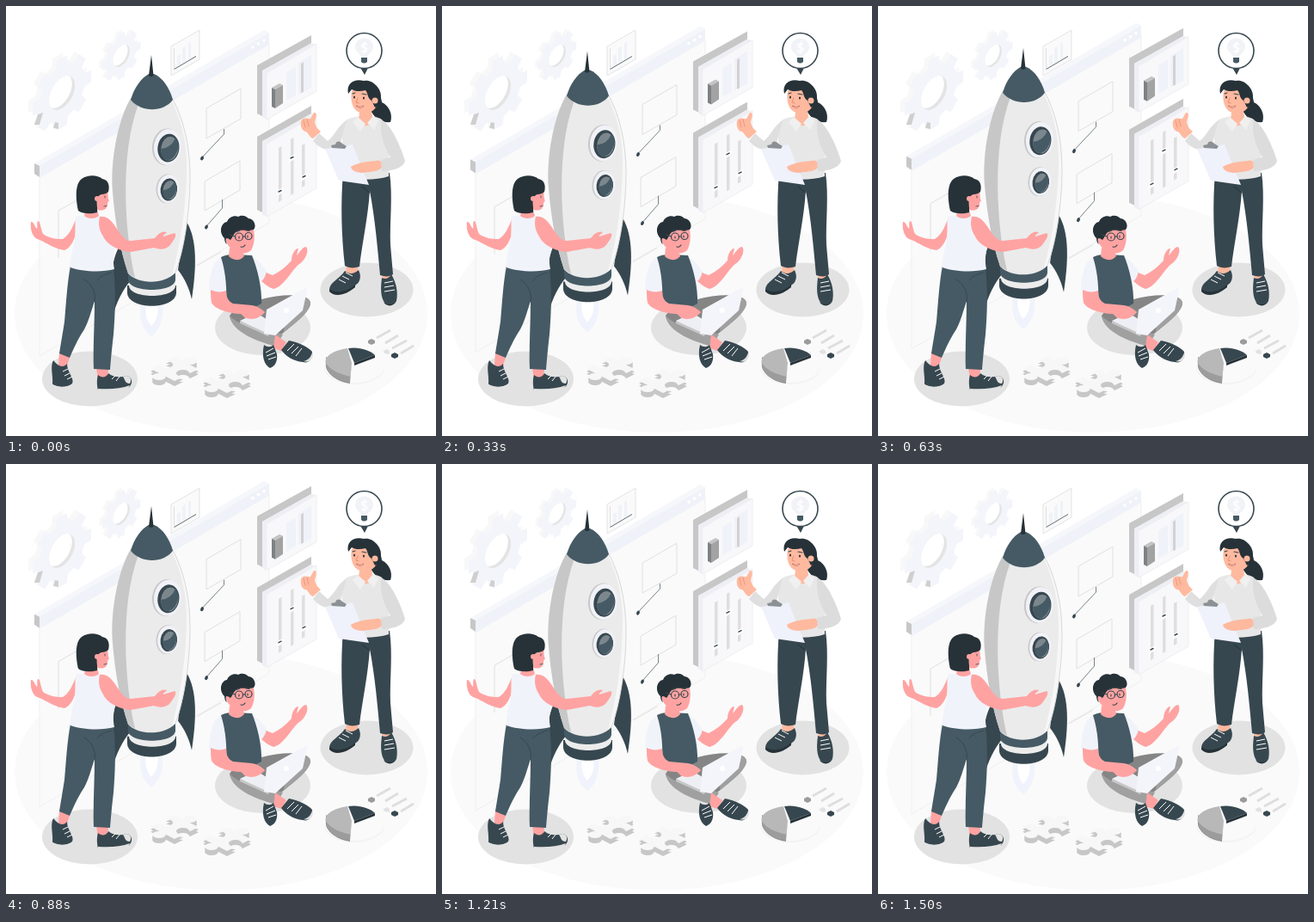
An HTML page for the animation above (1.54 s loop, 500 by 500 pixels).

```html
<!DOCTYPE html>
<html lang="en">
<head>
<meta charset="utf-8">
<title>Rocket launch team</title>
<style>
html, body { margin: 0; width: 100%; height: 100%; overflow: hidden; background: #fff; }
svg { display: block; width: 100%; height: 100%; }
.ink { fill: #263238; } .dark { fill: #37474f; } .slate { fill: #455a64; }
.pink { fill: #ffa3a2; } .peach { fill: #ffb99f; }
.snow { fill: #fafafa; } .mist { fill: #f0f2f9; } .pale { fill: #e2e2e2; } .grey { fill: #c7c7c7; }
.cloth { fill: #f1f3fb; }
.line { fill: none; stroke: #e0e0e0; }
.thin { fill: none; stroke: #37474f; stroke-linecap: round; }
.lace { fill: none; stroke: #fff; stroke-width: 1; }
</style>
</head>
<body>
<svg viewBox="0 0 500 500">
<defs>
  <path id="cog"/>
  <path id="piece" d="M-15-15h11a6 6 0 1 0 8 0h11v11a6 6 0 1 1 0 8v11h-11a6 6 0 1 0-8 0h-11v-11a6 6 0 1 1 0-8z"/>
  <g id="gear">
    <use href="#cog" fill="#f8f8f8" transform="translate(-6 -6)"/>
    <use href="#cog" fill="#f4f5fb"/>
    <circle r="18" fill="#e4e4e4"/>
    <clipPath id="hole"><circle r="18"/></clipPath>
    <g clip-path="url(#hole)"><circle cx="-4" cy="-4" r="18" fill="#fff"/></g>
  </g>
  <g id="puzzle">
    <use href="#piece" class="grey" transform="translate(0 6) matrix(.93 -.46 .93 .48 0 0)"/>
    <use href="#piece" class="grey" transform="translate(0 3) matrix(.93 -.46 .93 .48 0 0)"/>
    <use href="#piece" fill="#f7f7f7" transform="matrix(.93 -.46 .93 .48 0 0)"/>
  </g>
</defs>

<ellipse cx="250" cy="358" rx="240" ry="138" class="snow"/>
<g class="pale">
  <ellipse cx="97.500" cy="433.500" rx="55.500" ry="32"/>
  <ellipse cx="298.500" cy="374" rx="55.500" ry="32"/>
  <ellipse cx="419.500" cy="330" rx="54" ry="31.500"/>
</g>

<use href="#gear" transform="matrix(.84 -.48 0 1 65 101)"/>
<use href="#gear" transform="matrix(.55 -.31 0 .65 134 58)"/>
<path d="M33 138l4-12 6-2-4 14zM55 142l2-7 4 1v7z" fill="#cfcfcf"/>
<path d="M192 47l33-19v34l-33 19z" fill="#fafafa" stroke="#e4e4e4"/>
<path d="M199 58l4-2v12l-4 2zM205 49l4-2v17l-4 2zM212 44l3-2v19l-3 1z" class="mist"/>
<path d="M195.500 49v24" class="line"/>
<path d="M195.500 73.500L221 58.500" class="line" style="stroke:#606c72"/>

<g id="float">
  <path d="M39 198L306 43V252L39 407z" class="snow" stroke="#f0f0f0"/>
  <path d="M33 183L300 28l6 3L39 187z" fill="#f6f7fb"/>
  <path d="M39 186L306 31v14L39 200z" class="mist"/>
  <path d="M33 183l6 3v13l-6-4z" class="grey"/>
  <g fill="#fff"><circle cx="287" cy="48" r="1.800"/><circle cx="293.500" cy="44" r="1.800"/><circle cx="300" cy="40" r="1.800"/></g>
  <path d="M233 119l40-23v35l-40 23zM231 204l41-24v34l-41 24zM61 293V238l42-24M222 302l28-16" class="line"/>
  <path d="M253.500 143v6L229 175M251.500 225v10L234 255" class="line" style="stroke:#78838a"/>
  <ellipse cx="228" cy="177" rx="1.800" ry="2.600" class="dark" transform="rotate(25 228 177)"/>
  <ellipse cx="233" cy="257" rx="1.800" ry="2.600" class="dark" transform="rotate(25 233 257)"/>

  <path d="M292 69l63-35v10l-55 33v52l-8-4z" class="grey"/>
  <path d="M298 75l57-32 6 2-58 33v54l-5-3z" fill="#eeeff4"/>
  <path d="M303 78l58-34v55l-58 33z" fill="#f8f8fa" stroke="#efeff2"/>
  <path d="M309 95l9-5 4 2-9 5z" fill="#c4c4c4"/>
  <path d="M309 95l4 2v22l-4-2z" fill="#7d8285"/><path d="M313 97l9-5v21l-9 6z" fill="#a3a3a3"/>
  <path d="M326 77l11-6v33l-11 6zM340 66l15-9v38l-15 8z" class="mist"/>
  <path d="M343 67l3-2v35l-3 1z" fill="#d2d2d2"/>

  <path d="M292 152l63-36v9l-55 34v82l-8-4z" class="grey"/>
  <path d="M298 157l57-32 6 3-58 33v84l-5-3z" fill="#eeeff4"/>
  <path d="M303 160l58-34v86l-58 33z" fill="#f8f8fa" stroke="#efeff2"/>
  <path d="M317 165l3.500-2v63l-3.500 2zM331 155l3.500-2v65l-3.500 2zM344 162l3.500-2v49l-3.500 2z" fill="#dedede"/>
  <path d="M315 215l7-4v6l-7 4zM329 176l7-4v6l-7 4zM343 198l7-4v6l-7 4z" fill="#fff"/>
  <path d="M317 216l3-1.500M331 177l3-1.500M345 199l3-1.500" class="thin" stroke-width="1.500"/>

  <path d="M158 344c-5 19 1 33 11 40 11-8 15-23 13-40z" fill="#f0f3fc"/>
  <path d="M163 345c-2 13 1 22 6 27 6-6 9-15 7-27z" fill="#fff"/>
  <path d="M136 274c-14 15-16 48-12 88 4-18 12-32 21-43z" class="dark"/>
  <path d="M208 248c13 18 15 48 8 93-3-13-8-24-16-34z" class="dark"/>
  <path d="M141 325v8c0 21 57 21 57 0v-8z" class="dark"/>
  <path d="M143 317v8c0 16 54 16 54 0v-8z" fill="#ececec"/>
  <path d="M142 308v10c0 16 55 16 55 0v-10z" class="slate"/>
  <path d="M146 106c-15 23-25 72-22 110 3 37 9 68 18 95 12 13 42 13 55-1 10-27 17-70 17-112 0-37-8-69-21-92z" fill="#ebebeb"/>
  <path d="M146 106c-15 23-25 72-22 110 3 37 9 68 18 95l8 5c-12-53-18-143 4-202z" class="grey"/>
  <path d="M192 109c18 36 20 70 17 105-2 36-8 70-16 99l4-3c10-27 17-70 17-112 0-37-8-69-21-92z" fill="#f7f7f7"/>
  <path d="M193 107c13 23 21 55 21 91 0 42-7 85-17 112" class="line" style="stroke:#d9d9d9"/>
  <path d="M145 109c4-14 12-25 21-30h6c10 4 18 16 22 30-11 15-37 15-49 0z" class="slate"/>
  <path d="M166 81l3-24 2.500 24q-3 2-5.500 0z" class="ink"/>
  <g id="port" transform="rotate(7 188 164)">
    <ellipse cx="186.500" cy="164" rx="16.500" ry="21.500" class="grey"/>
    <ellipse cx="188" cy="164" rx="16" ry="21" fill="#f1f2f8"/>
    <ellipse cx="189" cy="165" rx="12.500" ry="16.500" class="dark"/>
    <ellipse cx="190.500" cy="165.500" rx="10" ry="14" fill="#7b878d"/>
    <path d="M180.500 167q2 12.500 10 12.500 9-4 10-18-2-7-5-9-3 12-15 14.500z" class="slate"/>
  </g>
  <use href="#port" transform="translate(42 83) scale(.78 .79)"/>
</g>

<!-- woman beside the rocket -->
<path d="M62 402l12 7-4 12-9-3zM105 420l14 2-1 14h-11z" class="pink"/>
<path d="M55 412c-4 8 0 17-1 28 7 4 17 4 23-1 3-6-6-13-6-23-4 5-10 4-16-4z" class="dark"/>
<path d="M53 439c7 5 18 5 25 0v2c-7 4-18 4-25 0z" class="pale"/>
<path d="M66 425l6-3m-4 8l6-3m-3 7l6-3" class="lace"/>
<path d="M107 429c-2 7-1 13 0 18 14 1 27 0 36-4 5-4 4-11-2-13-9 2-16 2-22-3-2 5-8 6-12 2z" class="dark"/>
<path d="M136 431c3 4 2 8 8 8 3-5 0-9-4-9zM107 445c14 1 27 0 37-4l-2 3c-8 4-22 5-35 4z" class="pale"/>
<path d="M123 434l4-4m1 6l4-5" class="lace"/>
<path d="M75 302l50 3c3 24 2 53 0 77-2 17-3 29-4 41l-19-1c-1-23 1-50 1-79-4 12-7 24-12 33-8 12-13 24-17 33l-12-5c2-13 4-24 6-37 2-22 3-44 7-65z" class="slate"/>
<path d="M103 344c2-12-4-21-12-26m31-8c-8 2-13 5-16 9" class="thin"/>
<path d="M82 246c-5 12-8 20-16 25-8 0-16-1-23-6-3-7-3-13-5-15-3 0-1 6-2 9-3-3-4-9-7-8-1 8 1 19 10 21 9 4 19 11 29 12 8-3 12-14 14-22z" class="pink"/>
<path d="M81 245c9-3 20 0 28-1 8 8 18 20 18 34-2 12-3 18-1 28-14 4-38 3-51-2-1-14 4-22 5-34 1-11 0-17 1-25z" class="cloth"/>
<path d="M109 245c10-2 16 8 22 17 4 6 8 11 14 11l28-3c4-6 10-9 14-7-2 3-5 3-4 5l13-4c4 2-2 10-6 15-6 5-12 4-18 2l-27 5c-14-1-28-9-32-18-5-8-6-15-4-23z" class="pink"/>
<path d="M93 236l13 1 2 7c-4 4-13 4-17 0zM104 218l14-5 .8 10 1 4-1.500 1c0 8-4 11-12 9z" class="pink"/>
<path d="M84 238c-3-14-4-31 4-37 7-5 18-5 24 0 7 1 9 8 7 15-4 4-8 2-10 4-6 3-2 13-3 20-7 2-17 2-22-2z" class="ink"/>
<circle cx="106" cy="224" r="3" class="pink"/>
<path d="M115 221v2m-1 10l3-.5" class="thin" stroke-width=".8"/>

<!-- man with the laptop -->
<path d="M297 341c25-7 56-7 57 4 0 13-26 29-42 44l-14-2c-16-8-36-14-38-27 8-11 21-18 37-19z" fill="#858585"/>
<path d="M325 341c16-6 29-2 29 5-1 10-19 24-31 33z" fill="#a0a0a0"/>
<path d="M260 360c10 13 37 13 62 22l-8 14c-18-5-52-16-54-36z" fill="#a0a0a0"/>
<path d="M313 382l13 9-6 10-9-3z" class="pink"/>
<path d="M300 394c-3 13 0 23 7 27 6-2 9-8 8-16l-4-11c-3 3-7 3-11 0zM320 400l9-11c12 2 23 8 27 13 1 9-4 14-11 12-10-1-19-6-25-14z" class="dark"/>
<path d="M302 403l9-5m-8 9l10-4m-8 8l9-3M327 401l8-8m-3 11l8-8m-3 11l7-9" class="lace"/>
<path d="M346 413c6-1 9-6 10-10l1 3c-1 6-5 9-11 7z" class="pale"/>
<path d="M290 302c7 4 13 9 20 11 8-4 16-10 22-17 0-8 5-15 8-14l-2 8c4-4 7-10 11-10 4 4-1 16-8 20-10 8-17 26-30 29-6-2-12-7-17-12z" class="pink"/>
<path d="M284 291c9 3 15 12 19 17-1 6-4 12-9 14zM251 292c-12 5-14 22-15 38 7 4 14 4 21 1z" class="cloth"/>
<path d="M250 292c10-5 24-2 36-2 6 14 12 38 11 56-11 7-29 8-41 1 1-15 0-36-6-55z" class="slate"/>
<path d="M260 281l15 3 2 7c-5 6-13 5-18 0z" class="pink"/>
<path d="M238 330c6 3 13 3 18 1 0 7 2 12 8 15l22 2c6 1 11 4 15 8-4 3-10 8-17 10-4-1-8-6-11-8-12 0-30-5-34-13-1-5-1-10-1-15z" class="pink"/>
<path d="M272 366l19-9 17 10-3 17z" fill="#eeeff4"/>
<path d="M276 361c7 5 17 4 25-5l-9-6-16 2z" class="pink"/>
<path d="M272 366l33 15v3l-33-15z" class="grey"/>
<path d="M303 353l45-25c2 0 2 2 2 3l-5 23-32 29-13-2z" fill="#f4f5fb"/>
<circle cx="326" cy="354" r="3" fill="#fff"/>
<path d="M256 262c10-8 22-10 31-6 3 11 2 21-2 28-5 5-14 4-21 0-8-6-11-15-8-22z" class="pink"/>
<path d="M254 270c-7-7-4-18 3-19 2-6 9-8 13-6 5-3 10 0 12 2 6 0 10 9 6 13-6 2-12 0-17 1-6 1-7 8-10 11-5-4-7-2-4 5-2-1-3-4-3-7z" class="ink"/>
<g class="thin" stroke-width="1.200"><circle cx="271" cy="268.500" r="4.500"/><circle cx="282" cy="267.500" r="4"/><path d="M266.500 268l-6-2M275.500 268h2.500M273 280q3 1 5-2"/></g>
<path d="M271 268v2m10-3v2M268 262.500l4-1.500m7 0l4 .5" class="thin" stroke-width="1.200"/>

<!-- woman with the clipboard -->
<path d="M396 300h14l-2 13h-13zM437 311l11-1 1 13h-11z" class="peach"/>
<path d="M376 329c1-8 12-12 18-21 5 4 10 4 16-1 4 8 1 15-3 17-9 10-24 14-31 5zM437 316c4 2 8 1 11-4 6 10 8 21 6 31-4 7-13 5-15 0-4-8-3-18-2-27z" class="dark"/>
<path d="M387 318l8 4m-4-8l8 4m-4-8l8 4M440 322l10-2m-10 7l11-2m-11 7l12-2" class="lace"/>
<path d="M376 329c8 6 22 3 30-5v3c-9 8-23 13-30 5zM439 344c5 4 11 4 15-1-3 7-12 7-15 1z" class="ink"/>
<path d="M392 194h54c4 27 0 57 1 84l3 34c-4 3-9 3-15 1-3-33-6-66-12-98-2 30-9 62-12 88-6 2-12 2-17-1-4-34-5-74-2-108z" class="dark"/>
<path d="M423 217l-9-7" class="thin" style="stroke:#263238"/>
<path d="M423 104c9-2 14 2 14 8 9 4 13 15 10 23-9 1-19-4-23-14z" class="ink"/>
<path d="M394 134c8-7 35-8 43-2 8 10 10 30 8 48v18c-15 5-39 5-55 0 3-23-2-45 4-64z" fill="#e7e7e7"/>
<path d="M396 133c-11 7-13 17-22 24l-10-9-7 9c10 11 20 13 31 6z" fill="#dfdfdf"/>
<path d="M366 146l-9 8c-4-1-5-6-8-8-5 0-7-7-6-12 3-6 7-2 11-3l4-7c5-1 2 7 1 11 1 5 3 8 7 11z" class="peach"/>
<path d="M346 133l2 8m2-9l2 8" class="thin" style="stroke:#e58e73" stroke-width=".8"/>
<path d="M411 123h14l2 11c-4 7-13 7-17-1z" class="peach"/>
<path d="M409 129l-6 6 9 11 6-9zM427 128l6 5-5 11-8-8z" fill="#f0f0f0"/>
<path d="M371 166l32-5 19 47-35-5z" fill="#eff1fb"/>
<path d="M378 162l5-1c1-5 6-4 8-1l5 3-2 3-15-1z" fill="#8b9194"/>
<path d="M401 187c8-5 19-6 29-7 4-2 8 2 8 6-2 5-10 7-18 7-5 2-18 1-19-6z" class="peach"/>
<path d="M436 132c12 5 24 34 28 48-2 9-17 12-27 12l-1-13 11-3c-6-11-12-22-11-44z" fill="#dcdcdc"/>
<path d="M402 99c8-8 23-7 30 0 3 10 0 24-12 25-12 3-21-7-18-25z" class="peach"/>
<path d="M398 102c-3-13 8-18 18-15 11-2 21 10 20 19 1 6-3 10-7 12l-4-8c-5-3-4-9-7-12-7 2-13 1-16-1z" class="ink"/>
<circle cx="429" cy="110" r="3.500" class="peach"/>
<ellipse cx="405" cy="106" rx="1" ry="1.500" class="ink"/><ellipse cx="416" cy="107" rx="1" ry="1.500" class="ink"/>
<path d="M403 102l3-1m8 1l5 1" class="thin" stroke-width="1.200"/>
<path d="M409 107l-2 5 3 1" class="thin" style="stroke:#e58e73"/>
<path d="M407 116q5 3 9 0-3 5-9 0z" fill="#fff" stroke="#b85b50" stroke-width=".6"/>

<!-- idea bubble -->
<path d="M411 70l6 10 5-10z" class="dark"/>
<circle cx="416.500" cy="52" r="20.500" fill="#fff" stroke="#37474f" stroke-width="1.600"/>
<path d="M413 60c0-4-7-6-7-12 0-14 21-14 21 0 0 6-7 8-7 12z" fill="#f2f3f7"/>
<text x="416.500" y="54" font-family="Lato, sans-serif" font-size="15" font-weight="700" text-anchor="middle" fill="#fff">$</text>
<path d="M413 60h7v5q-3.500 3-7 0z" class="slate"/>

<use href="#puzzle" transform="translate(196 422)"/>
<use href="#puzzle" transform="translate(257 436)"/>

<!-- pie chart and legend -->
<ellipse cx="405" cy="420" rx="35" ry="20" fill="#f3f3f3"/>
<ellipse cx="405" cy="418" rx="35" ry="20" class="snow"/>
<path d="M372 408v11c2 10 14 18 28 20v-12z" fill="#8e8e8e"/>
<path d="M402 415l-5-17c-15 2-28 9-25 18 2 8 14 13 28 15z" fill="#b8b8b8"/>
<path d="M402 415l-2 23c-17-3-30-12-28-23 4 8 16 13 28 16z" fill="#9c9c9c"/>
<path d="M405 415l-7-17c12-2 25 2 31 8z" class="dark"/>
<path d="M405 415l24-9v3l-24 9z" class="ink"/>
<g stroke="#dedede" stroke-width="3"><path d="M431 386l16-9M441 392l15-9M449 398l17-9M459 404l15-9"/></g>
<path d="M421 389l4-2 4 2v3l-4 2-4-2z" fill="#9c9c9c"/>
<path d="M439 401l4-2 3 2v3l-3 1-4-2z" class="pale"/>
<path d="M448 405l4-2 4 2v3l-4 2-4-2z" class="dark"/>
</svg>
<script>
const LOOP = 1540, FLOAT = 1500, STEPS = 36, RISE = 10;
const layer = document.getElementById("float");

function cogPath(teeth, outer, inner) {
  const points = [];
  for (let i = 0; i < teeth; i++)
    for (const [r, a] of [[inner, -.32], [outer, -.22], [outer, .22], [inner, .32]]) {
      const angle = (i + a) / teeth * 2 * Math.PI;
      points.push((r * Math.cos(angle)).toFixed(1) + " " + (r * Math.sin(angle)).toFixed(1));
    }
  return "M" + points.join("L") + "z";
}
document.getElementById("cog").setAttribute("d", cogPath(8, 41, 32));

// Linear rise and fall at 24 steps per second
function draw(now) {
  const step = Math.min(STEPS, Math.floor((now % LOOP + 3) * STEPS / FLOAT));
  const lift = RISE * (1 - Math.abs(2 * step / STEPS - 1));
  layer.setAttribute("transform", `translate(0 ${-lift})`);
  requestAnimationFrame(draw);
}
draw(0);
</script>
</body>
</html>
```
